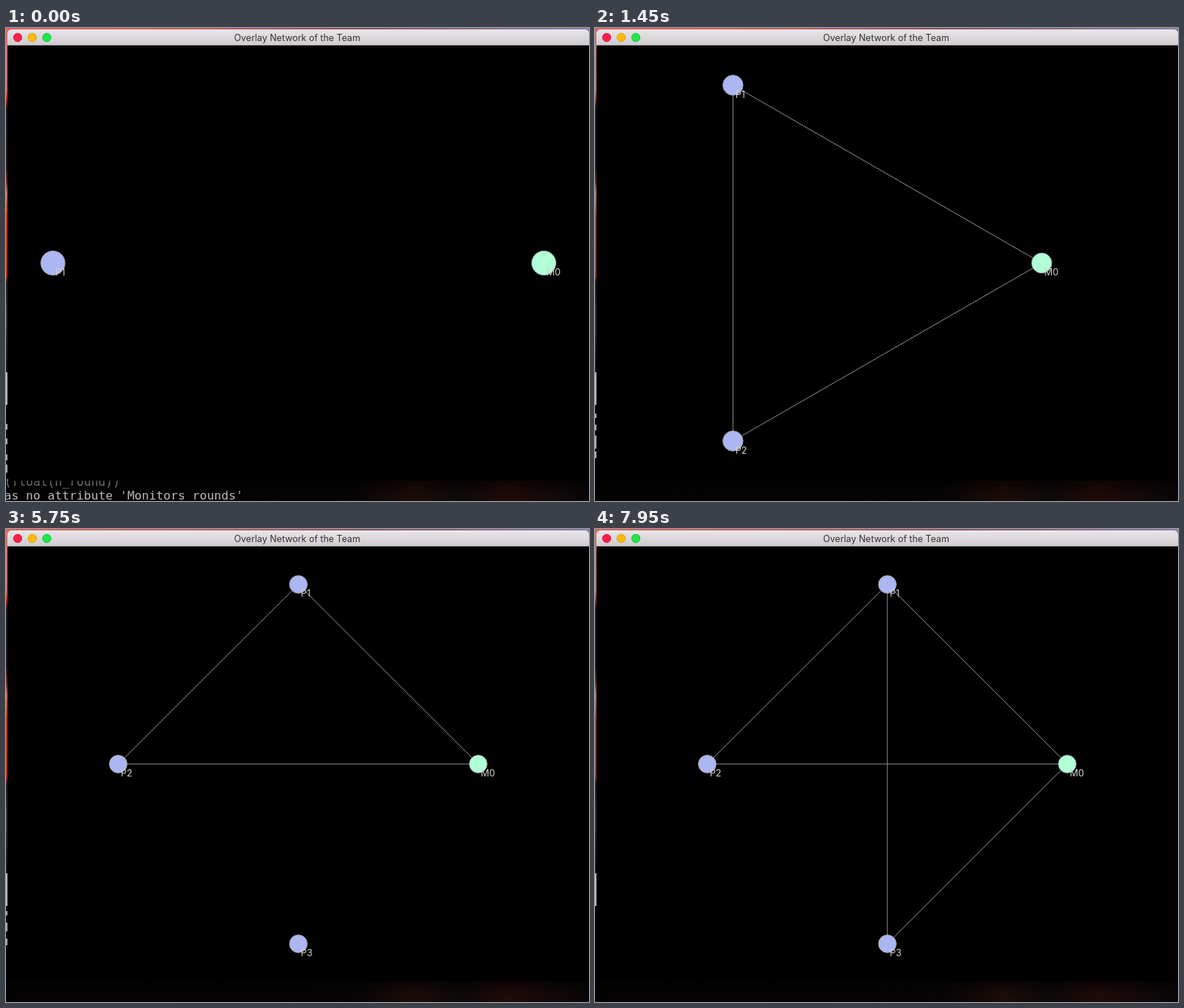
Write an HTML page with a canvas that moves like this. It is 800 px wide and 650 px high and loops after 8 s.

```html
<!DOCTYPE html>
<html lang="en">
<head>
<meta charset="utf-8">
<title>Overlay Network of the Team</title>
<style>
  html, body { margin: 0; width: 100%; height: 100%; overflow: hidden; background: #000; }
  canvas { display: block; }
</style>
</head>
<body>
<canvas id="stage" width="800" height="650"></canvas>
<script>
const LOOP = 8000;
const ctx = document.getElementById('stage').getContext('2d');

// Each layout: start time, when the newest node gets its links, node radius,
// node positions (M0, P1, P2, ...) and links as pairs of node indices.
const layouts = [
  { start: 0, linked: 300, radius: 17, nodes: [[738, 323], [64.4, 323]],
    links: [], newLinks: [[1, 0]] },
  { start: 750, linked: 1150, radius: 14.2, nodes: [[613, 323], [189.3, 78.6], [189.3, 567.5]],
    links: [[1, 0]], newLinks: [[2, 0], [2, 1]] },
  { start: 5750, linked: 6200, radius: 12.6, nodes: [[648, 323], [401.2, 76.1], [154, 323], [401.2, 570]],
    links: [[1, 0], [2, 0], [2, 1]], newLinks: [[3, 0], [3, 1]] }
];

// The terminal behind the window scrolls up one line at each of these times.
const scrollTimes = [300, 750, 1150, 5750, 6200];
const terminalLines = ['(float(n_round))', "as no attribute 'Monitors_rounds'", ' marlonvetch$ ./test.me'];

// Slivers of terminal glyphs left of the window: [top, height] per scroll state.
const sliversA = [[530, 6], [545, 8], [560, 18], [582, 9]];
const sliversB = [[525, 6], [541, 12], [563, 9]];
const slivers = [
  [[544, 8], [564, 8], [586, 8], [600, 11]],
  [[526, 8], [544, 9], [570, 10], [597, 13]],
  sliversA, sliversA, sliversB, []
];

function gradient(x0, y0, x1, y1, stops) {
  const g = ctx.createLinearGradient(x0, y0, x1, y1);
  for (const [at, color] of stops) g.addColorStop(at, color);
  return g;
}

function rect(x, y, w, h, fill) {
  ctx.fillStyle = fill;
  ctx.fillRect(x, y, w, h);
}

function circle(x, y, r, fill, stroke) {
  ctx.beginPath();
  ctx.arc(x, y, r, 0, 2 * Math.PI);
  ctx.fillStyle = fill;
  ctx.fill();
  ctx.strokeStyle = stroke;
  ctx.lineWidth = 1;
  ctx.stroke();
}

function text(label, x, y, font, fill) {
  ctx.font = font;
  ctx.fillStyle = fill;
  ctx.fillText(label, x, y);
}

function drawDesktop(scroll) {
  rect(0, 0, 800, 650, '#040404');
  rect(0, 0, 800, 8, gradient(0, 0, 800, 0,
    [[0, '#e8605c'], [.3, '#c4625e'], [.6, '#8c5560'], [1, '#8a7cae']]));
  rect(0, 3, 2, 470, gradient(0, 0, 0, 473,
    [[0, '#e07068'], [.18, '#b87070'], [.2, '#d03a20'], [.23, '#301818'], [.25, '#141a2c'],
     [.4, '#20151c'], [.45, '#70301c'], [.48, '#b87860'], [.55, '#c03418'], [.72, '#b02c18'],
     [.74, '#202024'], [.85, '#30343c'], [1, '#101014']]));
  rect(0, 473, 2, 45, '#b4b4b4');
  for (const [y, h] of slivers[scroll]) rect(0, y, 2, h, '#a8a8a8');

  rect(0, 622, 800, 28, gradient(0, 0, 800, 0,
    [[0, '#030303'], [.6, '#060404'], [.7, '#1c0c08'], [.78, '#0c0808'],
     [.86, '#200a08'], [.95, '#100808'], [1, '#080506']]));
  terminalLines.slice(scroll, scroll + 2).forEach((line, i) =>
    text(line, -2.5, 629 + 19.3 * i, '16.5px "DejaVu Sans Mono", monospace', '#c0c0c0'));
  rect(0, 622, 800, 20, gradient(0, 622, 0, 642,
    [[0, 'rgba(0,0,0,.55)'], [1, 'rgba(0,0,0,0)']]));
}

function drawWindow() {
  ctx.beginPath();
  ctx.roundRect(2, 2, 798, 620, [5, 5, 4, 4]);
  ctx.fillStyle = '#000';
  ctx.fill();
  ctx.beginPath();
  ctx.roundRect(2, 2, 798, 22, [5, 5, 0, 0]);
  ctx.fillStyle = gradient(0, 2, 0, 24, [[0, '#eeebee'], [.1, '#e6e3e6'], [1, '#cfcbcf']]);
  ctx.fill();
  rect(2, 23, 798, 1, '#aaa6aa');
  circle(16, 13, 5.7, '#fc2049', '#dc1a40');
  circle(36, 13, 5.7, '#fcbb0f', '#dda00c');
  circle(56, 13, 5.7, '#1fe84b', '#18c43e');
  text('Overlay Network of the Team', 313, 17.6, '12.5px Inter, sans-serif', '#333');
}

function drawNetwork(layout, t) {
  const { nodes, radius } = layout;
  const links = t < layout.linked ? layout.links : layout.links.concat(layout.newLinks);
  ctx.strokeStyle = '#929292';
  ctx.lineWidth = 1;
  for (const [a, b] of links) {
    ctx.beginPath();
    ctx.moveTo(...nodes[a]);
    ctx.lineTo(...nodes[b]);
    ctx.stroke();
  }
  nodes.forEach(([x, y], i) => {
    circle(x, y, radius - .4, i ? '#acb6f2' : '#b0ffd6', '#a4a4a8');
    text((i ? 'P' : 'M') + i, x + 3.4, y + 17, '12.8px Inter, sans-serif', '#d2d0ce');
  });
}

function draw() {
  const t = performance.now() % LOOP;
  drawDesktop(scrollTimes.filter(time => t >= time).length);
  drawWindow();
  drawNetwork(layouts.findLast(layout => t >= layout.start), t);
  requestAnimationFrame(draw);
}
draw();
</script>
</body>
</html>
```
